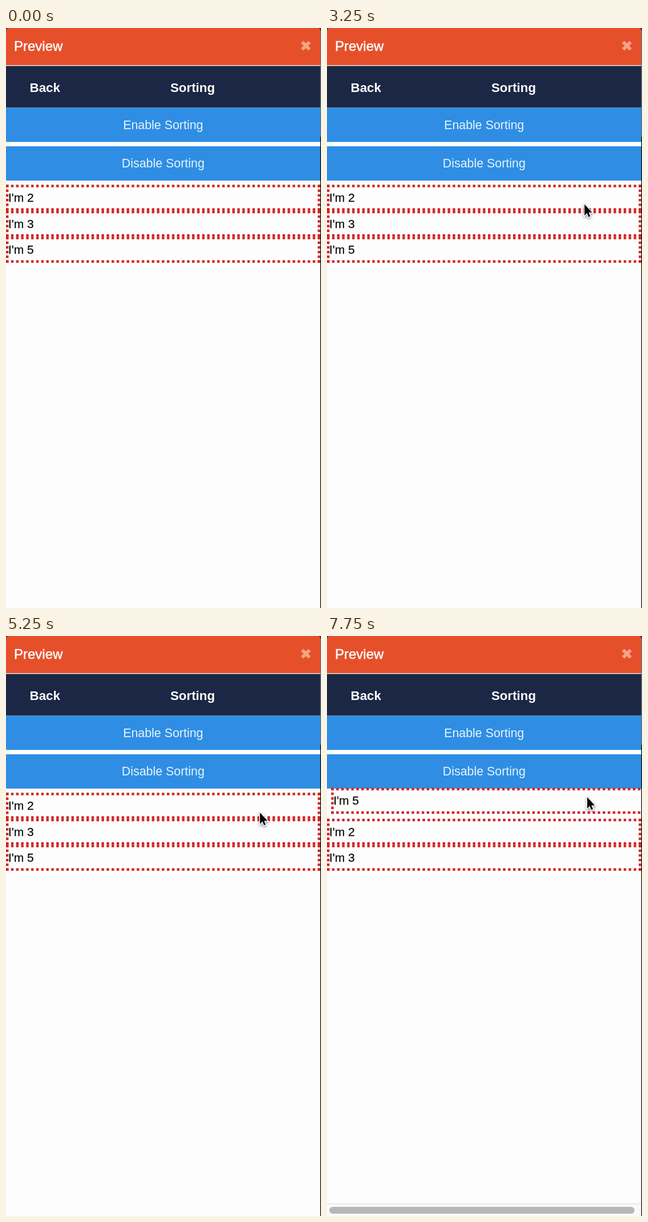
Animation of 552 by 1015 pixels, one loop 8000 ms. Source, as an HTML page with a canvas:

```html
<!DOCTYPE html>
<html lang="en">
<head>
<meta charset="utf-8">
<title>Sorting preview</title>
<style>
  html, body { margin: 0; width: 100%; height: 100%; overflow: hidden; background: #fdfdfd; }
  canvas { display: block; }
</style>
</head>
<body>
<canvas id="stage" width="552" height="1015"></canvas>
<script>
const ctx = document.getElementById('stage').getContext('2d');
const W = 552, H = 1015, LOOP = 8000, STEP = 250;
const LIST_TOP = 274.3, ROW = 45.5, ITEM_W = 550.7, DOT = 4.4;
const FONT = '"Liberation Sans", Arial, sans-serif';

// Pointer path: step, x, y
const path = [
  [4, 520, 882], [5, 490, 608], [6, 478, 420], [7, 470, 335], [8, 468, 318],
  [11, 458, 309], [16, 441, 305], [17, 442, 311], [18, 436, 343], [19, 430, 372],
  [20, 436, 342], [21, 445, 308], [23, 457, 342], [24, 457, 359], [25, 454, 412],
  [26, 451, 378], [27, 448, 349], [29, 449, 335], [30, 450, 315], [31, 456, 281]
];

// Item order from each step on
const orders = [[0, '235'], [18, '325'], [20, '235'], [25, '253'], [31, '523']];

// Dragged item by step: label, x offset, top
const drags = {
  17: ['2', 0, 280.5], 18: ['2', -5, 320], 19: ['2', -10.3, 350.7], 20: ['2', -5, 320],
  24: ['3', 0, 337.5], 25: ['3', -3, 390.5],
  30: ['5', 0, 300], 31: ['5', 7.3, 265.7]
};

function box(color, x, y, w, h) {
  ctx.fillStyle = color;
  ctx.fillRect(x, y, w, h);
}

function text(str, x, y, size, color, { align = 'left', weight = '', thicken = 0 } = {}) {
  ctx.font = `${weight} ${size}px ${FONT}`;
  ctx.textAlign = align;
  ctx.fillStyle = ctx.strokeStyle = color;
  ctx.fillText(str, x, y);
  if (thicken) {
    ctx.lineWidth = thicken;
    ctx.strokeText(str, x, y);
  }
}

function dots(x, y, dx, dy, count) {
  for (let i = 0; i <= count; i++) {
    box('#d02422', x + dx * i / count, y + dy * i / count, DOT, DOT);
  }
}

function item(label, x, y) {
  const w = ITEM_W - DOT, h = ROW - DOT;
  dots(x, y, w, 0, 62);
  dots(x, y + h, w, 0, 62);
  dots(x, y, 0, h, 5);
  dots(x + w, y, 0, h, 5);
  text("I'm " + label, x + 3.9, y + 29.7, 21, '#111', { thicken: 0.3 });
}

function header() {
  box('#4a2a24', 0, 0, W, 8);
  ctx.fillStyle = '#e5502b';
  ctx.beginPath();
  ctx.roundRect(0, 0, 551, 65, [5, 5, 0, 0]);
  ctx.fill();
  box('#fbeee8', 0, 65, W, 1.4);
  box('#1b2744', 0, 66.4, W, 73);
  box('#2f8ee4', 0, 139.4, W, 60);
  box('#2f8ee4', 0, 207, W, 60);
  text('Preview', 14, 39.5, 24, '#fff', { thicken: 0.5 });
  text('Back', 41.5, 111.5, 22.4, '#fff', { weight: 'bold' });
  text('Sorting', 327, 111.5, 22.3, '#fff', { align: 'center', weight: 'bold' });
  text('Enable Sorting', 275.3, 176.5, 21.4, '#e6f4ff', { align: 'center' });
  text('Disable Sorting', 275.3, 244, 21.4, '#e6f4ff', { align: 'center' });

  ctx.strokeStyle = '#f3a488';
  ctx.lineWidth = 6;
  ctx.beginPath();
  ctx.moveTo(519, 24.5); ctx.lineTo(532, 37.5);
  ctx.moveTo(532, 24.5); ctx.lineTo(519, 37.5);
  ctx.stroke();
}

function scrollbar() {
  box('#fafafa', 0, 993, W, 22);
  box('#e6e6e6', 0, 993, W, 1.5);
  ctx.fillStyle = '#b8b8b8';
  ctx.beginPath();
  ctx.roundRect(4, 999, 535, 12, 6);
  ctx.fill();
}

function pointerAt(step) {
  const next = path.findIndex(p => p[0] >= step);
  const b = path[next];
  if (b[0] === step) return b.slice(1);
  if (next === 0) return null;
  const a = path[next - 1], k = (step - a[0]) / (b[0] - a[0]);
  return [a[1] + (b[1] - a[1]) * k, a[2] + (b[2] - a[2]) * k];
}

const arrow = new Path2D('M0 0V16.6L3.8 13L6.2 18.6L8.8 17.5L6.4 12H11.6Z');

function pointer([x, y]) {
  ctx.save();
  ctx.translate(x, y + 1);
  ctx.scale(1.15, 1.2);
  ctx.lineWidth = 2.2;
  ctx.strokeStyle = '#fff';
  ctx.shadowColor = 'rgba(0,0,0,.45)';
  ctx.shadowBlur = 4;
  ctx.shadowOffsetY = 2;
  ctx.stroke(arrow);
  ctx.shadowColor = 'transparent';
  ctx.fillStyle = '#050505';
  ctx.fill(arrow);
  ctx.restore();
}

function draw(step) {
  box('#fdfdfd', 0, 0, W, H);
  header();

  const order = orders.filter(o => o[0] <= step).pop()[1];
  const drag = drags[step];
  [...order].forEach((label, slot) => {
    if (!drag || drag[0] !== label) item(label, 0, LIST_TOP + slot * ROW);
  });
  if (drag) {
    item(...drag);
    if (drag[1] > 0) scrollbar();
  }

  // Window edge
  box('#6b6f7a', 550.7, 5, 1.3, 185);
  box('#111', 550.7, 190, 1.3, H - 190);

  const at = pointerAt(step);
  if (at) pointer(at);
}

const start = performance.now();
function tick() {
  const t = Math.max(0, performance.now() - start) % LOOP;
  draw(Math.floor(t / STEP));
  requestAnimationFrame(tick);
}
tick();
</script>
</body>
</html>
```
